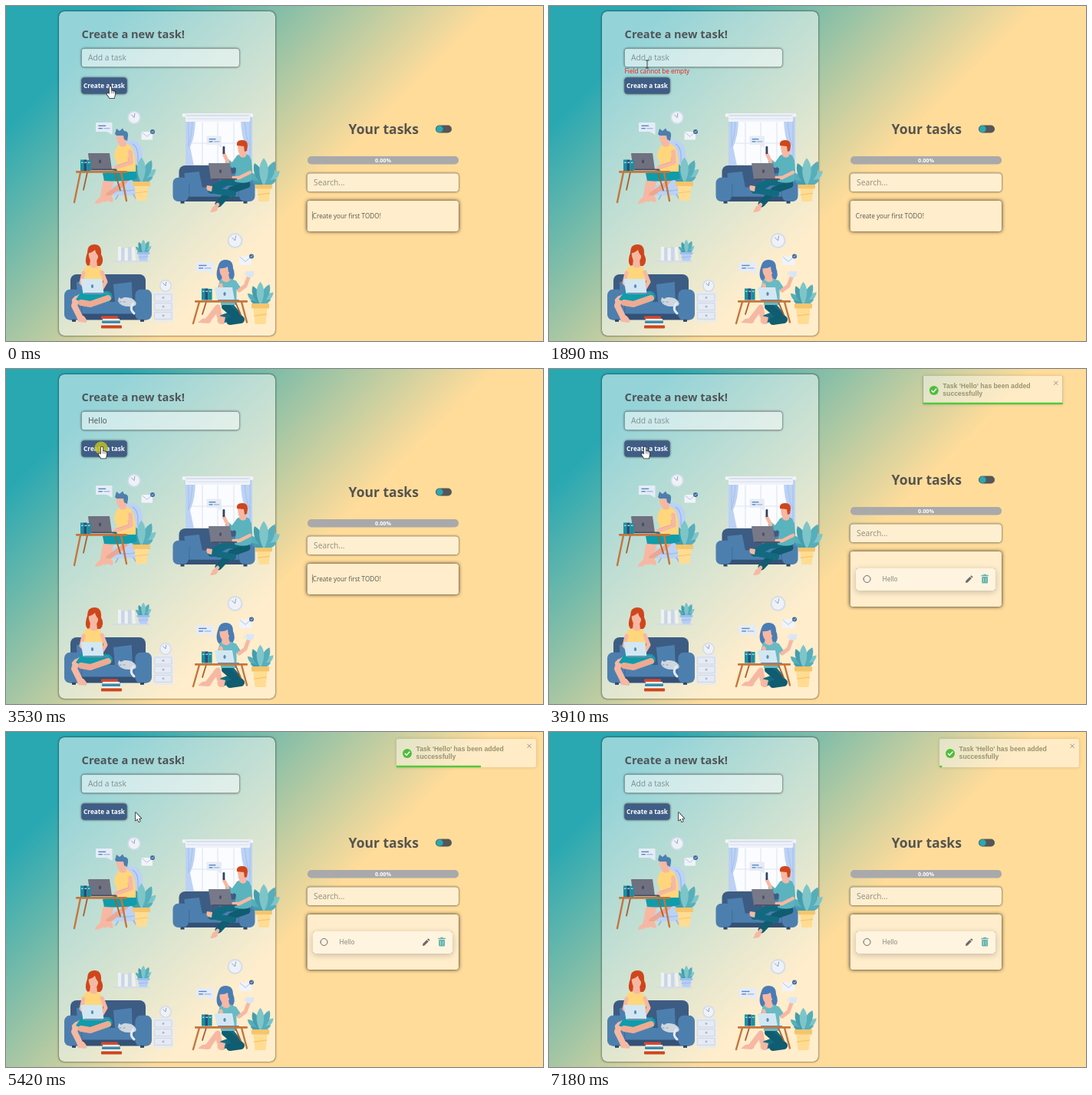
Write an HTML page with a canvas that moves like this. It is 700 px wide and 437 px high and loops after 7310 ms.

```html
<!DOCTYPE html>
<html lang="en">
<head>
<meta charset="utf-8">
<title>Task list</title>
<style>
  html, body { margin: 0; width: 100%; height: 100%; overflow: hidden; }
  canvas { display: block; }
</style>
</head>
<body>
<canvas id="stage" width="700" height="437"></canvas>
<script>
const W = 700, H = 437, LOOP = 7310;
const stage = document.getElementById("stage").getContext("2d");
const backdrop = document.createElement("canvas");
backdrop.width = W;
backdrop.height = H;
let g = backdrop.getContext("2d");

const SANS = '"Open Sans", sans-serif', ARIAL = '"Liberation Sans", Arial, sans-serif';
const skin = "#f6b8a3", navy = "#3d5c83", blue = "#4d7fae", teal = "#0f9cab", petrol = "#136a80";
const sea = "#5ab3bd", sun = "#ffd67c", red = "#cf461c", wood = "#c5763c", pale = "#e6ecf6", sky = "#bcd2f5";

// Drawing helpers
function fill(color, d) {
  g.fillStyle = color;
  g.fill(new Path2D(d));
}
function line(color, width, d) {
  g.strokeStyle = color;
  g.lineWidth = width;
  g.lineCap = g.lineJoin = "round";
  g.stroke(new Path2D(d));
}
function box(color, x, y, w, h, r = 0) {
  g.fillStyle = color;
  g.beginPath();
  g.roundRect(x, y, w, h, r);
  g.fill();
}
function oval(color, x, y, rx, ry = rx, turn = 0) {
  g.fillStyle = color;
  g.beginPath();
  g.ellipse(x, y, rx, ry, turn, 0, 7);
  g.fill();
}
function text(str, x, y, size, color, weight = 400, family = SANS, align = "left") {
  g.font = `${weight} ${size}px ${family}`;
  g.textAlign = align;
  g.fillStyle = color;
  g.fillText(str, x, y);
}
// Translucent box whose shadow falls only outside its edge
function card(color, x, y, w, h, r, blur, shadow, dy = 0) {
  g.save();
  g.beginPath();
  g.rect(0, 0, W, H);
  g.roundRect(x, y, w, h, r);
  g.clip("evenodd");
  g.shadowColor = shadow;
  g.shadowBlur = blur;
  g.shadowOffsetY = dy;
  box("#000", x, y, w, h, r);
  g.restore();
  box(color, x, y, w, h, r);
}

// Furnishings
function leaf(color, x, y, degrees, length) {
  g.save();
  g.translate(x, y);
  g.rotate(degrees * Math.PI / 180);
  g.scale(length, length);
  fill(color, "M0 0C-.2 -.35 -.22 -.75 0 -1C.22 -.75 .2 -.35 0 0Z");
  g.restore();
}
function plant(x, y, size, w, h, potColor, rimColor) {
  const leaves = [[-48, .8], [46, .85], [-22, .95], [24, 1.05], [0, 1.08], [-66, .5], [62, .55]];
  leaves.forEach(([angle, k], i) =>
    leaf(["#57aebb", "#7dc5c8", "#459dad"][i % 3], x, y + 2, angle, size * k));
  fill(potColor, `M${x - w * .42} ${y}H${x + w * .42}L${x + w * .3} ${y + h}H${x - w * .3}Z`);
  box(rimColor, x - w / 2, y, w, h * .24, 1);
  line(rimColor, 1.2, `M${x - w * .34} ${y + h * .6}L${x + w * .34} ${y + h * .52}`);
}
function clock(x, y, r) {
  oval("#d3dce9", x, y, r);
  oval("#eef2f8", x, y, r * .8);
  line("#8597b5", .9, `M${x - r * .4} ${y - r * .4}L${x} ${y}L${x + r * .1} ${y - r * .6}`);
}
function bubble(x, y, w, h) {
  fill(pale, `M${x + w * .6} ${y + h - 1}H${x + w}V${y + h + 4}Z`);
  box(pale, x, y, w, h, 1);
  box("#5588c0", x + w * .16, y + h * .3, w * .45, 1.4);
  box("#5588c0", x + w * .16, y + h * .58, w * .25, 1.4);
  box("#9bbce4", x + w * .48, y + h * .58, w * .38, 1.4);
}
function envelope(x, y, w, h) {
  box("#f0f3fa", x, y, w, h, 1);
  line("#a7b8d2", .8, `M${x + 1} ${y + 1}L${x + w / 2} ${y + h * .6}L${x + w - 1} ${y + 1}`);
  oval("#3f6a9e", x + w, y, 3);
  line("#fff", .7, `M${x + w - 1.3} ${y}l1 1l1.7 -2`);
}
function books(x, y) {
  box("#1a8f9d", x, y, 5, 15);
  box("#254d7c", x + 4.6, y, 4, 15);
  box("#1a8f9d", x + 8.6, y + .5, 5, 14.5);
  for (const dx of [1, 5.3, 9.8]) box("#9fd6dc", x + dx, y + 3, 2.6, 1.5);
}
function desk(x, y, w, h) {
  line("#a85f2c", 1.8, `M${x + 15} ${y + 2}L${x + 10} ${y + h * .6}M${x + w - 16} ${y + 2}L${x + w - 9} ${y + h * .62}`);
  line(wood, 2.4, `M${x + 6} ${y + 2}L${x - 2} ${y + h}M${x + w - 8} ${y + 2}L${x + w - 1} ${y + h * .95}`);
  box(wood, x, y, w, 2.8, 1);
}
function laptop(color, dark, x, y, w, h) {
  fill(color, `M${x} ${y + 1}Q${x} ${y} ${x + 1} ${y}H${x + w - 3}L${x + w} ${y + h}H${x + 3}Z`);
  box(dark, x + 4, y + h - 1, w + 2, 1.8, 1);
  oval(dark, x + w / 2, y + h / 2, 1.6, 2.6);
}
function sofa(x, y, w, h) {
  box(navy, x + 8, y, w - 16, h * .88, 8);
  fill(blue, `M${x + w * .14} ${y + 10}L${x + w * .32} ${y + 8}L${x + w * .36} ${y + h * .6}H${x + w * .15}Z`);
  fill(blue, `M${x + w * .56} ${y + 13}L${x + w * .77} ${y + 10}L${x + w * .78} ${y + h * .6}H${x + w * .58}Z`);
  box(blue, x + 14, y + h * .58, w - 28, h * .26, 3);
  box("#345176", x + 6, y + h * .83, w - 12, h * .13, 2);
  box(blue, x, y + h * .32, w * .19, h * .64, 7);
  box(blue, x + w * .81, y + h * .32, w * .19, h * .64, 7);
  line("#3b6996", .8, `M${x + w * .2} ${y + h * .5}V${y + h * .83}M${x + w * .8} ${y + h * .5}V${y + h * .83}`);
  box("#2d4769", x + 10, y + h * .95, 5, 3);
  box("#2d4769", x + w - 15, y + h * .95, 5, 3);
}

function armchairScene() {
  clock(167, 145.5, 8.7);
  bubble(117, 152, 21.5, 12);
  envelope(176.5, 164, 14.5, 10.5);
  fill(sky, "M152 183Q154 173 165 175Q178 177 178 196L180 232Q180 245 167 247L137 247Q127 245 132 237L156 228Z");
  line("#93b5ea", 1.2, "M165 180Q173 184 172 202L174 231Q172 241 160 241H138");
  line("#93b5ea", 1.5, "M146 247L143 252M166 246L170 252");
  plant(176.5, 229, 31, 23, 25, "#ffdc92", "#f5c56d");
  line(skin, 7, "M161 222L138 226L129 252");
  line("#eda78f", 6, "M158 226L150 234L132 247");
  line(skin, 7, "M155 221L131 223L126 250");
  fill(skin, "M123 249L129 250Q128 257 116 258Q115 255 123 249Z");
  fill(skin, "M130 247L137 247Q142 254 138 256L129 253Z");
  fill(teal, "M169 212L171 225Q158 230 128 228L126 218L150 212Z");
  fill(sun, "M147 181Q158 177 164 184Q170 194 169 216H145Q146 204 141 197Q141 188 147 181Z");
  fill(skin, "M147 174H156L157 182Q151 186 147 181Z");
  fill(skin, "M143.5 168Q150 164 158 167L158 174Q155 181 148 180Q144 178 143.5 168Z");
  fill(blue, "M142 167L144 160L148 163L152 159.5L154 163Q160 163 159 170L158 176L154 174L153 169L144 169Z");
  line(skin, 5.5, "M162 190L163 204L143 211");
  line("#eaa78e", .8, "M159 197L160 203L145 208");
  laptop("#6f7080", "#4b4c5c", 107, 192, 31, 21.5);
  books(97, 200.5);
  desk(91, 215, 67, 41);
}

function windowScene() {
  box("#fbfcff", 237, 148, 79, 59);
  line("#dfe6f1", 1.2, "M276 152V207M238 179H316M256 152V207M297 152V207");
  fill(sky, "M234 144H247Q247 170 240 184L245 208H234Z");
  fill(sky, "M306 144H321V208H308L313 184Q306 170 306 144Z");
  line("#9dbbe9", .8, "M238 150V184M318 150V206M243 150Q242 170 238 182M311 150Q313 172 317 182");
  box("#eff2f9", 234, 140, 84, 11, 1);
  line("#cfd8e8", .8, "M236 143.5H316M236 147H316");
  line("#d9dfea", 1.5, "M231 142.5H321");
  oval("#f2f4f9", 232, 142.5, 2.4);
  oval("#f2f4f9", 320, 142.5, 2.4);
  bubble(261.5, 169.5, 19.5, 11.5);
  sofa(217.5, 208, 107, 49);
  plant(336, 233, 34, 22, 22, "#ffdc92", "#f5c56d");
  line(petrol, 10, "M313 230L288 229L268 240");
  line("#105c70", 9, "M314 233L294 240L277 258");
  line(petrol, 8, "M268 240L296 245");
  line(skin, 4.5, "M276 259L272 264");
  fill(skin, "M270 261L276 263Q277 269 266 269Z");
  fill(skin, "M262 234L269 235L268 242Q259 241 262 234Z");
  fill(sea, "M301 195Q309 190 317 195Q322 204 320 228Q312 233 298 229L300 212L293 207Z");
  line(sea, 6, "M303 199L295 208L289 203");
  line(skin, 4.5, "M289 203L284 193");
  box("#33435f", 282.5, 183, 2.8, 10, 1);
  fill(skin, "M304 188H313V196Q308 200 304 195Z");
  fill(skin, "M301.5 180Q307 176 314 180L313 188Q308 195 303 191Z");
  fill(red, "M301 182Q300 175 307 175Q315 174 315 182L314 189L311 190L310 183Z");
  line(sea, 6, "M317 202L318 216");
  line(skin, 4.5, "M318 217L304 224L296 224");
  laptop("#787988", "#505160", 264, 205, 31, 21);
}

function catScene() {
  box("#d6dce8", 139, 332, 48, 2.2, 1);
  for (let i = 0; i < 4; i++) box(i % 2 ? "#c9d5e8" : "#eef1f7", 146 + i * 4.4, 314 + i % 3, 3.9, 18 - i % 3);
  fill("#eef1f7", "M164 315L167.5 314L169 332H165Z");
  plant(179, 321, 17, 17, 11.5, "#b6cef5", "#9bbcf0");
  clock(208, 365, 8);
  box("#e5eaf3", 192, 373, 26, 38.5, 1);
  for (let y = 376; y < 410; y += 11.7) {
    line("#c7d1e1", .8, `M194 ${y}H216V${y + 9}H194Z`);
    oval("#aab8cd", 205, y + 4.5, 1.4);
  }
  sofa(76, 350, 114, 62);
  // sleeping cat
  fill("#ced6df", "M146 385L147 380L150 382L154 380Q165 379 169 386Q172 391 164 392Q149 393 146 385Z");
  line("#e4e9ef", 3, "M166 388Q160 395 167 401");
  line("#748397", .7, "M148 386H150M153 386H155");
  fill(red, "M106 322Q106 311 115 311Q125 311 124 324Q129 333 123 339L108 340Q101 336 106 322Z");
  line(skin, 8, "M132 381L101 377L90 384");
  line(skin, 8, "M92 382L89 391L97 407");
  fill(skin, "M92 404L101 404Q108 411 104 413L94 412Z");
  fill(teal, "M99 371L134 372Q144 379 133 387L105 389L91 383Z");
  line("#eeaa93", 8, "M133 381L110 389L98 387");
  fill(sun, "M104 340Q114 335 123 341Q128 355 126 376H102Q104 362 99 354Q99 344 104 340Z");
  fill(skin, "M110 330H118L119 340Q114 344 109 339Z");
  fill(skin, "M107.5 321Q113 315 120 320L120 328Q118 335 113 335Q108 332 107.5 321Z");
  fill(red, "M106 323Q109 314 117 315Q123 317 122 328Q117 323 116 318Q112 322 106 323Z");
  line(skin, 5, "M101 348L98 361L106 369M125 347L130 360L124 370");
  laptop("#d3e7f2", "#5a8bb6", 97.5, 356, 30, 19);
  box("#d8492e", 124, 404.5, 22, 4, 1);
  box("#f0f3f7", 126, 408, 22, 2.5);
  box("#3c8ba5", 125, 410.5, 24, 3.5, 1);
  box("#f0f3f7", 125, 414, 25, 2.5);
  box("#cf461c", 124, 416.5, 27, 4, 1);
}

function teaScene() {
  clock(298.5, 306, 10);
  bubble(247.5, 334, 23, 12.5);
  envelope(304, 326.5, 16, 11.5);
  plant(331.5, 388, 28, 23, 27, "#ffdc92", "#f5c56d");
  line(skin, 7, "M278 404L276 393L263 410");
  line(petrol, 11, "M289 389L300 402L283 408");
  line("#105c70", 10, "M286 392L306 409L292 411");
  fill(skin, "M256 408L266 407Q270 413 263 414L250 413Z");
  fill(skin, "M277 404L286 406L284 415Q272 416 277 404Z");
  fill("#4a7cb6", "M277 338Q279 331 286 331Q296 331 296 342Q300 351 295 358L280 360Q271 355 277 338Z");
  fill("#69bac4", "M279 357Q288 353 297 357Q302 366 300 390H280Q281 375 276 368Z");
  fill(skin, "M282 350H290L292 358Q286 363 281 357Z");
  fill(skin, "M278.5 341Q285 336 292 341L291 349Q287 355 283 354Q278 351 278.5 341Z");
  fill("#4a7cb6", "M277 342Q280 332 288 334Q295 336 294 350L290 347L289 340Q284 343 277 342Z");
  line("#69bac4", 6, "M298 361L304 370");
  line(skin, 5, "M304 371L312 365L316 354");
  fill("#d9e6f6", "M313 346H323Q324 353 319 354H316Q313 353 313 346Z");
  line("#d9e6f6", 1, "M313 348H311V351H314");
  line(skin, 5, "M280 364L282 376L294 382");
  laptop("#d3e7f2", "#5a8bb6", 272, 367, 26, 17);
  books(255, 368.5);
  desk(246, 384, 69, 30);
}

function paintBackdrop() {
  const wash = g.createLinearGradient(0, 0, 568.5, 568.5);
  wash.addColorStop(.14, "#29a8b2");
  wash.addColorStop(.56, "#ffdc9a");
  box(wash, 0, 0, W, H);
  card("rgba(255,255,255,.5)", 69, 7, 282, 423, 7, 3, "rgba(0,0,0,.75)");
  text("Create a new task!", 98.6, 42, 14.6, "#505558", 700);
  card("rgba(255,255,255,.5)", 98.5, 55.5, 205.5, 24, 4, 3, "rgba(0,0,0,.8)");
  card("#3f5d85", 98.5, 93.5, 59, 21, 4, 3, "rgba(0,0,0,.8)");
  text("Create a task", 128, 107, 8.2, "#fff", 700, SANS, "center");
  armchairScene();
  windowScene();
  catScene();
  teaScene();
}

// What the user does, as changes that stay until overwritten
const script = [
  [0, { cursor: "hand", x: 136, y: 105.5, typed: "", error: false, press: false, caret: false, added: false }],
  [380, { press: true }],
  [630, { press: false, error: true }],
  [890, { cursor: "arrow", x: 131, y: 86 }],
  [1140, { cursor: "beam", x: 128, y: 76 }],
  [1390, { press: true, caret: true }],
  [1890, { press: false, caret: false }],
  [2270, { typed: "He", error: false, caret: true }],
  [2520, { typed: "Hell" }],
  [2780, { typed: "Hello" }],
  [3030, { caret: false }],
  [3280, { cursor: "hand", x: 125, y: 102 }],
  [3530, { press: true }],
  [3910, { press: false, typed: "", added: true }],
  [5170, { cursor: "arrow", x: 169, y: 105 }]
];
const stateAt = t => Object.assign({}, ...script.filter(([at]) => at <= t).map(([, change]) => change));

// The picture refreshes about four times a second, with a few longer rests
const refreshes = [0, 380, 630, 890, 1140, 1390, 1890, 2270, 2520, 2780, 3030, 3280, 3530,
  3910, 4170, 4420, 4670, 4920, 5170, 5420, 5670, 5920, 6170, 6430, 6680, 6930, 7180];

function drawForm(s) {
  text(s.typed || "Add a task", 107, 71.2, 10.3, s.typed ? "#4b5355" : "rgba(95,110,112,.72)");
  if (s.caret) {
    const end = s.typed ? 107.5 + g.measureText(s.typed).width : 107;
    box("#333", end, 62, .8, 11);
  }
  if (s.error) text("Field cannot be empty", 98.6, 88.2, 8.2, "#f21a12");
}

function drawTasks(s, t) {
  const dy = s.added ? -16 : 0;
  text("Your tasks", 446.6, 167 + dy, 17.5, "#55534f", 700);
  box("#555657", 560, 155.5 + dy, 21, 10, 5);
  oval("#2aa8b2", 565.3, 160.5 + dy, 4.4);
  box("#a9a9ab", 393, 196 + dy, 197, 10.5, 5);
  text("0.00%", 491.5, 203.5 + dy, 7.2, "#fff", 700, SANS, "center");
  card("rgba(255,255,255,.55)", 392.5, 218.3 + dy, 197.5, 24, 4, 3, "rgba(0,0,0,.75)");
  text("Search...", 401, 234 + dy, 10.3, "rgba(110,108,98,.75)");
  card("rgba(255,255,255,.48)", 392.5, 254 + dy, 197.5, s.added ? 72 : 40, 3, 5, "rgba(0,0,0,.85)");
  if (s.added) drawTask();
  else {
    text("Create your first TODO!", 399.8, 277, 8.2, "#5a564e");
    if ((t + 150) % 1060 < 530) box("#777168", 399.3, 268, .8, 11);
  }
}

function drawTask() {
  card("#fff4e0", 400, 260, 182, 29, 4, 8, "rgba(0,0,0,.22)", 2);
  line("#666", 1, "M410 274a4.5 4.5 0 1 0 9 0a4.5 4.5 0 1 0 -9 0");
  text("Hello", 434.6, 277, 8.2, "#807b73");
  fill("#6b6a67", "M543 279L543.4 276.2L548.6 271L550.8 273.2L545.6 278.5ZM549.2 270.4L550.5 269.2L552.6 271.3L551.4 272.6Z");
  box("#62b3ae", 563.3, 268.8, 9.6, 1.4);
  box("#62b3ae", 566.3, 267.8, 3.6, 1.2);
  box("#62b3ae", 564.2, 270.9, 7.8, 8.6, 1);
  line("#c8e0d6", .8, "M566.5 273V277.5M569.7 273V277.5");
}

// Entrance: overshoot, then smaller swings to rest
function bounceIn(p) {
  const keys = [[0, 3000], [.6, -25], [.75, 10], [.9, -5], [1, 0]];
  const i = keys.findIndex(([at]) => at > p);
  if (i < 0) return 0;
  const [p0, x0] = keys[i - 1], [p1, x1] = keys[i];
  return x0 + (x1 - x0) * (1 - (1 - (p - p0) / (p1 - p0)) ** 3);
}
function drawToast(t) {
  g.save();
  g.translate(bounceIn((t - 3535) / 700), 0);
  card("rgba(255,255,255,.42)", 509, 9, 182, 37, 1, 4, "rgba(0,0,0,.16)");
  oval("#4fbd3c", 523, 28, 6);
  line("#fff", 1.4, "M520.2 28.2L522.2 30.3L526 26");
  text("Task 'Hello' has been added", 534.6, 25, 8.64, "#98936f", 700, ARIAL);
  text("successfully", 534.6, 35, 8.64, "#98936f", 700, ARIAL);
  line("#8f8d7c", .9, "M679.8 16L684.4 20.6M684.4 16L679.8 20.6");
  const left = Math.min(1, Math.max(0, 1 - (t - 4235) / 3000));
  box("#52c83f", 509, 43.8, 182 * left, 2.4);
  g.restore();
}

const pointers = {
  hand: "M-1.2 0Q0 -1 1.2 0V5L4.4 5.6Q6.6 6 6.3 8.5L5.2 14.5H-1L-4.4 9.6Q-4.4 7.8 -2.6 8.3L-1.2 9.6Z",
  arrow: "M0 0V10.4L2.4 8.3L4.1 12.2L5.8 11.4L4.1 7.7H7.3Z"
};
function drawCursor(s) {
  const lift = s.cursor === "beam" ? 0 : 1;
  if (s.press) oval("rgba(190,190,38,.85)", s.x - lift, s.y + lift, 8.6);
  g.save();
  g.translate(s.x, s.y);
  if (s.cursor === "beam") line("#333", .9, "M-2 -5H2M0 -5V5M-2 5H2");
  else {
    line("#222", 1.5, pointers[s.cursor]);
    fill("#fff", pointers[s.cursor]);
    if (s.cursor === "hand") line("#555", .6, "M1.2 5V8M3 5.6V8.2M4.7 6V8.4");
  }
  g.restore();
}

function render(time) {
  const t = refreshes.findLast(at => at <= time);
  const s = stateAt(t);
  g.drawImage(backdrop, 0, 0);
  drawForm(s);
  drawTasks(s, t);
  if (s.added) drawToast(t);
  drawCursor(s);
}

paintBackdrop();
g = stage;
const start = performance.now();
function tick() {
  render((performance.now() - start) % LOOP);
  requestAnimationFrame(tick);
}
tick();
</script>
</body>
</html>
```
